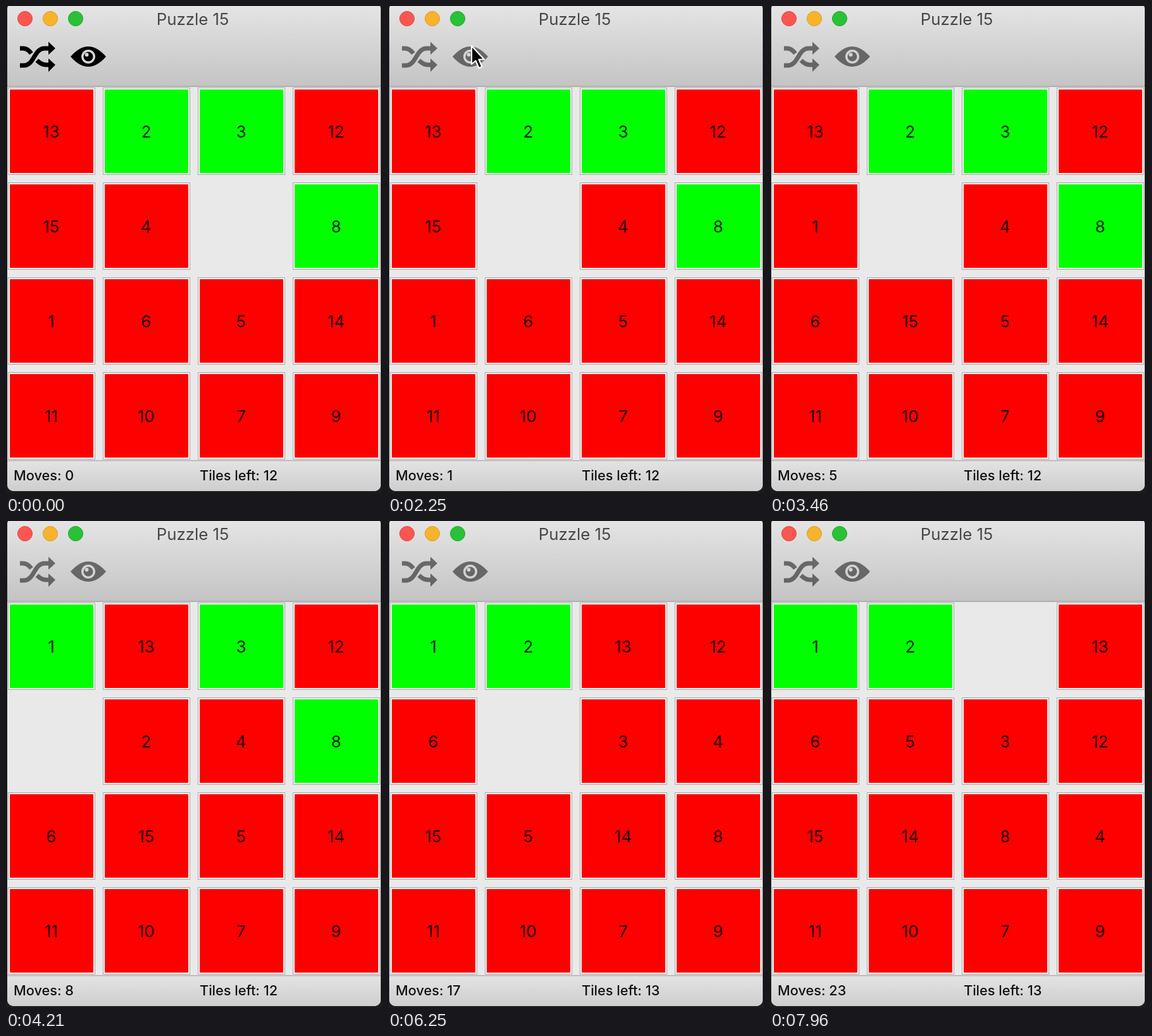
An HTML page for the animation above (8 s loop, 594x770 px).

```html
<!DOCTYPE html>
<html lang="en">
<head>
<meta charset="utf-8">
<title>Puzzle 15</title>
<style>
  html, body { margin: 0; width: 100%; height: 100%; overflow: hidden; background: #1c1c1c; }
  svg { display: block; width: 594px; height: 770px; }
  text { font-family: Inter, Roboto, sans-serif; fill: #111; }
  .title { font-size: 25.8px; fill: #474747; text-anchor: middle; }
  .status { font-size: 21.7px; font-weight: 500; }
  .tile text { font-size: 26px; text-anchor: middle; fill: #000; fill-opacity: .86; }
  .frame { fill: #f3f3f3; stroke: #a9a9a9; }
  .strand { fill: none; stroke: #000; stroke-width: 7; }
  .cut { fill: #d6d6d6; }
</style>
</head>
<body>
<svg viewBox="0 0 594 770">
  <defs>
    <linearGradient id="bar" x1="0" y1="0" x2="0" y2="1">
      <stop offset="0" stop-color="#e4e4e4"/>
      <stop offset="1" stop-color="#c4c4c4"/>
    </linearGradient>
    <linearGradient id="foot" x1="0" y1="0" x2="0" y2="1">
      <stop offset="0" stop-color="#e3e3e3"/>
      <stop offset="1" stop-color="#cecece"/>
    </linearGradient>
    <clipPath id="window"><rect x="2" y="-5" width="590" height="772" rx="10"/></clipPath>
  </defs>

  <g clip-path="url(#window)">
    <rect width="594" height="770" fill="#e9e9e9"/>
    <rect width="594" height="127" fill="url(#bar)"/>
    <rect y="126.5" width="594" height="1.5" fill="#a6a6a6"/>
    <rect y="719" width="594" height="48" fill="url(#foot)"/>
    <rect y="718" width="594" height="1.5" fill="#b0b0b0"/>
  </g>

  <circle cx="30" cy="20" r="11.5" fill="#fa5750" stroke="#dd4440"/>
  <circle cx="70" cy="20" r="11.5" fill="#f8b32d" stroke="#dc9c28"/>
  <circle cx="110" cy="20" r="11.5" fill="#29c237" stroke="#20a62c"/>
  <text class="title" x="295" y="30">Puzzle 15</text>

  <g id="tools">
    <path class="strand" d="M22 67h5c6 0 10 4 13 8M49 86c4 4 8 7 14 7h5M22 94h6c17 0 16-27 33-27h8"/>
    <path d="M67 56.500L78 67 67 77zM67 83L78 93 67 104z"/>
    <path d="M102 80Q130 48 158 80Q130 112 102 80z"/>
    <circle class="cut" cx="130" cy="80" r="11"/>
    <circle cx="130" cy="80" r="7.5"/>
    <circle class="cut" cx="127.500" cy="77" r="3"/>
  </g>

  <g id="board"></g>
  <text class="status" id="moves" x="12" y="750"></text>
  <text class="status" id="left" x="306" y="750"></text>
  <path id="cursor" d="M0 0V29L6.500 23.500 11.500 35 16.500 33 11.500 21.500H20z"
        stroke="#fff" stroke-width="2.200" stroke-linejoin="round"/>
</svg>

<script>
const LOOP = 8000, FIRST_MOVE = 2235, MOVE_EVERY = 250;
const START = [13, 2, 3, 12, 15, 4, 0, 8, 1, 6, 5, 14, 11, 10, 7, 9];
const SLIDES = [4, 15, 1, 6, 15, 2, 13, 1, 6, 15, 5, 14, 8, 4, 3, 13, 2, 5, 14, 8, 4, 12, 13];

// Pointer path: time, x, y
const POINTER = [
  [780, 190, -40], [1350, 132, 63], [2540, 132, 63], [2980, -30, 110]
];

const byId = id => document.getElementById(id);

function make(name, attrs, parent) {
  const node = document.createElementNS(byId('board').namespaceURI, name);
  for (const key in attrs) node.setAttribute(key, attrs[key]);
  return parent.appendChild(node);
}

function makeTile(number) {
  const group = make('g', { class: 'tile' }, byId('board'));
  make('rect', { class: 'frame', x: 3.5, y: 129.5, width: 137, height: 137 }, group);
  const face = make('rect', { x: 6, y: 132, width: 132, height: 132 }, group);
  make('text', { x: 71.5, y: 208 }, group).textContent = number;
  return { number, group, face };
}

const tiles = Array.from({ length: 15 }, (_, i) => makeTile(i + 1));

// Each slide swaps one tile with the gap.
const boards = [START];
for (const number of SLIDES) {
  const next = [...boards[boards.length - 1]];
  const from = next.indexOf(number), gap = next.indexOf(0);
  next[gap] = number;
  next[from] = 0;
  boards.push(next);
}

let shown = -1;
function showBoard(moves) {
  if (moves === shown) return;
  shown = moves;
  let left = 0;
  for (const { number, group, face } of tiles) {
    const cell = boards[moves].indexOf(number);
    const home = cell === number - 1;
    if (!home) left++;
    group.setAttribute('transform', `translate(${cell % 4 * 150} ${Math.floor(cell / 4) * 150})`);
    face.setAttribute('fill', home ? '#00ff00' : '#fd0000');
  }
  byId('moves').textContent = `Moves: ${moves}`;
  byId('left').textContent = `Tiles left: ${left}`;
}

function showPointer(t) {
  const i = POINTER.findIndex(step => step[0] > t);
  byId('cursor').style.display = i > 0 ? '' : 'none';
  if (i <= 0) return;
  const [t0, x0, y0] = POINTER[i - 1], [t1, x1, y1] = POINTER[i];
  const p = (t - t0) / (t1 - t0), ease = p * p * (3 - 2 * p);
  byId('cursor').setAttribute('transform',
    `translate(${x0 + (x1 - x0) * ease} ${y0 + (y1 - y0) * ease})`);
}

const begin = performance.now();
function draw() {
  const t = (performance.now() - begin) % LOOP;
  const moves = Math.floor((t - FIRST_MOVE) / MOVE_EVERY) + 1;
  showBoard(Math.max(0, Math.min(SLIDES.length, moves)));
  byId('tools').setAttribute('opacity', t < FIRST_MOVE - MOVE_EVERY ? 1 : 0.5);
  showPointer(t);
  requestAnimationFrame(draw);
}
draw();
</script>
</body>
</html>
```
